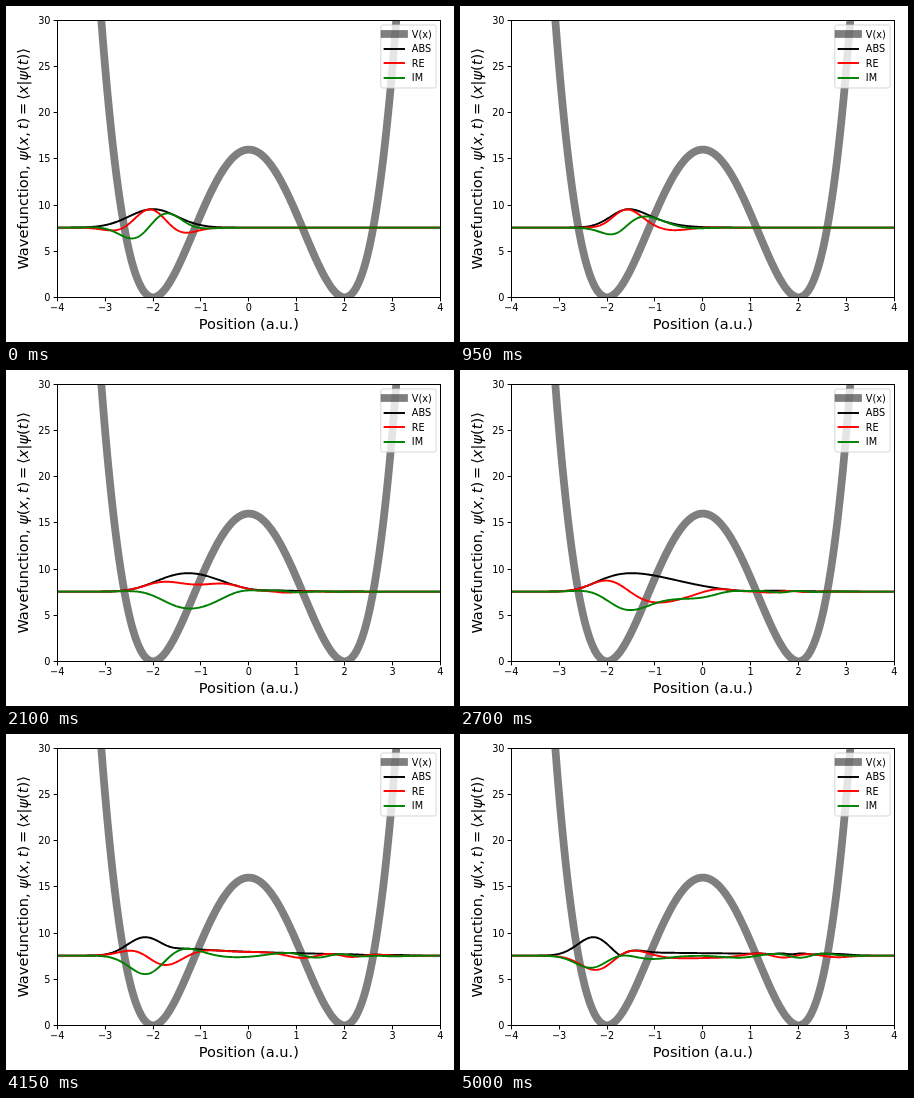
Animation, 448 px wide and 336 px high, one loop 5050 ms. Source, as an HTML page:

```html
<!DOCTYPE html>
<html lang="en">
<head>
<meta charset="utf-8">
<title>Wave packet in a double well</title>
<style>
  html, body { margin: 0; width: 100%; height: 100%; overflow: hidden; background: #fff; }
  svg { display: block; width: 448px; height: 336px; font: 9.72px "DejaVu Sans", sans-serif; }
  .curve { fill: none; stroke-width: 1.94; stroke-linejoin: round; stroke-linecap: square; }
  .well { fill: none; stroke: #000; stroke-opacity: .5; stroke-width: 7.78; stroke-linecap: square; }
  .abs { stroke: #000; }
  .re { stroke: #f00; }
  .im { stroke: #008000; }
  .axes { fill: none; stroke: #000; stroke-width: 1; }
  .title { font-size: 14.58px; text-anchor: middle; }
  .title tspan { font-style: oblique; }
</style>
</head>
<body>
<svg viewBox="0 0 448 336">
  <clipPath id="plot"><rect x="51" y="14" width="384" height="278"/></clipPath>
  <g clip-path="url(#plot)">
    <path id="well" class="well"/>
    <path id="abs" class="curve abs"/>
    <path id="re" class="curve re"/>
    <path id="im" class="curve im"/>
  </g>
  <rect class="axes" x="51.5" y="14.5" width="383" height="277"/>
  <g id="ticks"></g>
  <text class="title" x="242.8" y="322.5">Position (a.u.)</text>
  <text class="title" transform="translate(22 152.9) rotate(-90)">Wavefunction, <tspan>ψ</tspan>(<tspan>x</tspan>,<tspan dx=".2em">t</tspan>)<tspan dx=".2em" style="font-style:normal">=</tspan><tspan dx=".2em" style="font-style:normal">⟨</tspan><tspan>x</tspan>|<tspan>ψ</tspan>(<tspan>t</tspan>)⟩</text>
  <g>
    <rect x="374.8" y="19" width="55.3" height="63" rx="2" fill="#fff" fill-opacity=".8" stroke="#ccc" stroke-opacity=".8"/>
    <path class="well" d="M378.6 28H398"/>
    <path class="curve abs" d="M378.6 43H398"/>
    <path class="curve re" d="M378.6 57H398"/>
    <path class="curve im" d="M378.6 72H398"/>
    <text x="405.8" y="31.5">V(x)</text>
    <text x="405.8" y="46.2">ABS</text>
    <text x="405.8" y="60.8">RE</text>
    <text x="405.8" y="75.4">IM</text>
  </g>
</svg>
<script>
const FRAMES = 101, FRAME_MS = 50;
const N = 501, DX = 8 / (N - 1), DT = 0.001, STEPS = 10;
const X0 = -2, WIDTH = 0.5, K = 3, HEIGHT = 2;

const byId = id => document.getElementById(id);
const px = x => 51.2 + (x + 4) * 383.2 / 8;
const py = y => 291.3 - y * 276.9 / 30;
const potential = x => (x * x - 4) ** 2;
const xs = Array.from({ length: N }, (_, j) => -4 + j * DX);
const trace = f => "M" + xs.map((x, j) => px(x).toFixed(2) + " " + py(f(x, j)).toFixed(2)).join("L");

function drawTicks() {
  let out = "";
  for (let v = -4; v <= 4; v++) {
    const x = px(v), snapped = Math.floor(x) + 0.5;
    out += `<path class="axes" d="M${snapped} 292v3.4"/>` +
      `<text x="${x}" y="305.3" text-anchor="middle">${String(v).replace("-", "−")}</text>`;
  }
  for (let v = 0; v <= 30; v += 5) {
    const y = py(v), snapped = Math.floor(y) + 0.5;
    out += `<path class="axes" d="M51 ${snapped}h-3.4"/>` +
      `<text x="44.5" y="${y + 3.5}" text-anchor="end">${v}</text>`;
  }
  byId("ticks").innerHTML = out;
}

// Crank–Nicolson evolution of a Gaussian packet, hbar = m = 1
const re = new Float64Array(N), im = new Float64Array(N);
const dr = new Float64Array(N), di = new Float64Array(N);
const gr = new Float64Array(N), gi = new Float64Array(N);
const b = -DT / (4 * DX * DX);

xs.forEach((x, j) => {
  const g = Math.exp(-((x - X0) ** 2) / (2 * WIDTH ** 2));
  re[j] = g * Math.cos(K * x);
  im[j] = g * Math.sin(K * x);
  // reciprocal pivots of the tridiagonal solve
  const mr = 1 + (j ? b * b * gr[j - 1] : 0);
  const mi = DT / 2 * (1 / (DX * DX) + potential(x)) + (j ? b * b * gi[j - 1] : 0);
  const n = mr * mr + mi * mi;
  gr[j] = mr / n;
  gi[j] = -mi / n;
});

function step() {
  for (let j = 0; j < N; j++) {
    const r = re[j] + (j ? b * di[j - 1] : 0);
    const i = im[j] - (j ? b * dr[j - 1] : 0);
    dr[j] = r * gr[j] - i * gi[j];
    di[j] = r * gi[j] + i * gr[j];
  }
  let cr = 0, ci = 0;
  for (let j = N - 1; j >= 0; j--) {
    const r = dr[j] + b * (gi[j] * cr + gr[j] * ci);
    const i = di[j] - b * (gr[j] * cr - gi[j] * ci);
    cr = r;
    ci = i;
    re[j] = 2 * r - re[j];
    im[j] = 2 * i - im[j];
  }
}

function snapshot() {
  const mag = xs.map((_, j) => Math.hypot(re[j], im[j]));
  const scale = HEIGHT / Math.max(...mag);
  const curve = values => trace((_, j) => energy + scale * values[j]);
  return { abs: curve(mag), re: curve(re), im: curve(im) };
}

// mean energy: kinetic part plus the well averaged over the packet
const spread = WIDTH ** 2 / 2;
const energy = K * K / 2 + 1 / (4 * WIDTH ** 2) + 16 * spread + 3 * spread ** 2;

const frames = [];
for (let f = 0; f < FRAMES; f++) {
  frames.push(snapshot());
  for (let s = 0; s < STEPS; s++) step();
}

let shown = -1;
function show(index) {
  if (index === shown) return;
  shown = index;
  for (const id in frames[index]) byId(id).setAttribute("d", frames[index][id]);
}

drawTicks();
byId("well").setAttribute("d", trace(potential));
show(0);
const start = performance.now();
function tick() {
  show(Math.floor((performance.now() - start) / FRAME_MS) % FRAMES);
  requestAnimationFrame(tick);
}
requestAnimationFrame(tick);
</script>
</body>
</html>
```
